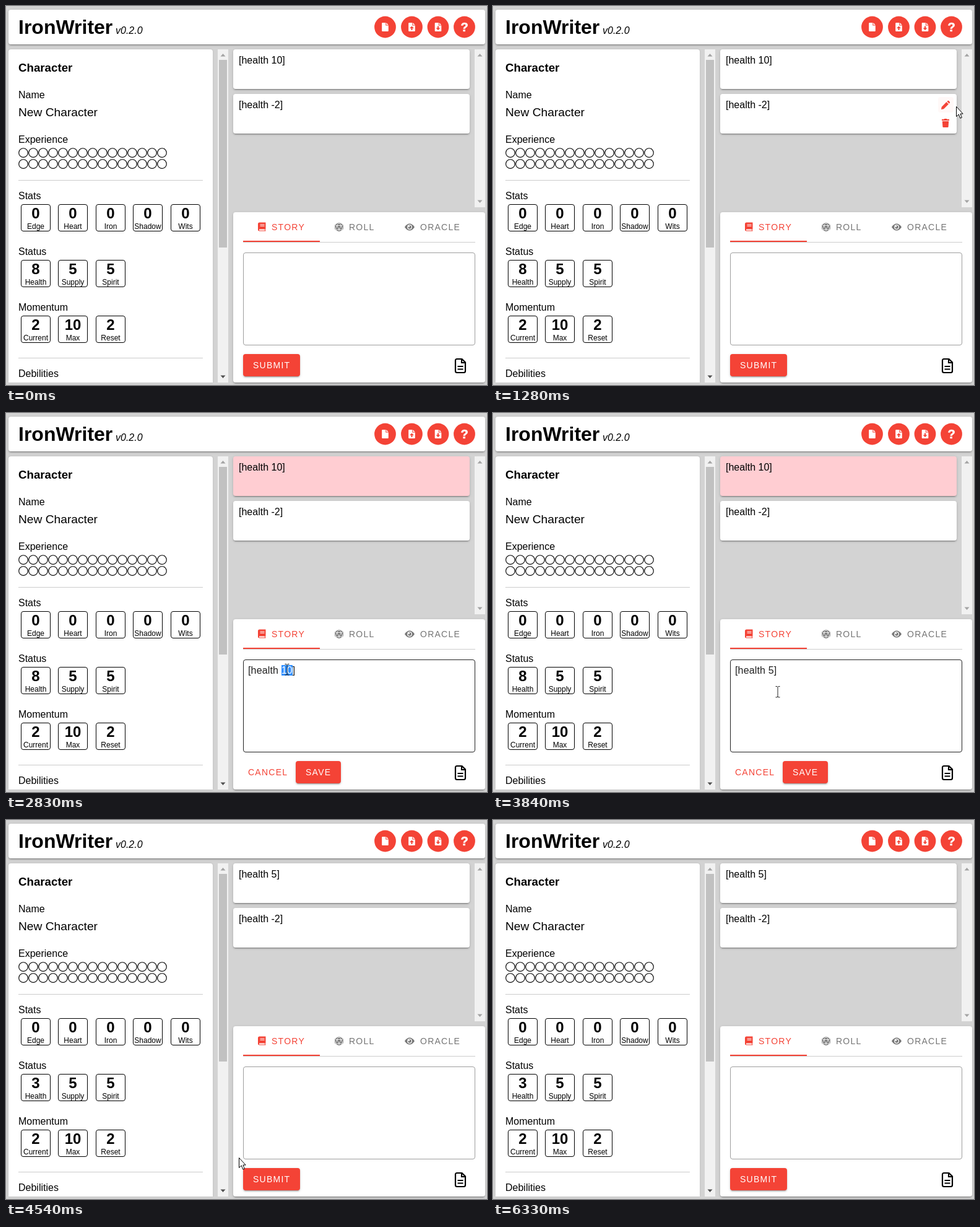
Animation of 777 by 612 pixels, one loop 6630 ms. Source, as an HTML page:

```html
<!DOCTYPE html>
<html lang="en">
<head>
<meta charset="utf-8">
<title>Character sheet</title>
<style>
  html, body { margin: 0; width: 100%; height: 100%; overflow: hidden; }
  body { position: relative; background: #d3d3d3; color: #000; font-family: "Liberation Sans", Arial, sans-serif; }
  body *, svg { position: absolute; }
  svg { left: 0; top: 0; }
  svg *, #area * { position: static; }
  .card, .button { border-radius: 4px; background: #fff;
    box-shadow: 0 3px 1px -2px #0003, 0 2px 2px #00000024, 0 1px 5px #0000001f; }
  .button, .button.raised { background: #f44336; }
  .button.hover { background: #f6554a; }
  .button.raised { background: #f6554a; box-shadow: 0 5px 5px -3px #0003, 0 8px 10px 1px #00000024, 0 3px 14px 2px #0000001f; }
  .pink { background: #ffcdd2; }
  .track { background: #f1f1f1; }
  .box { box-sizing: border-box; border: 1px solid #000; border-radius: 4px; }
  .text { white-space: pre; }
  .caps { letter-spacing: 1.25px; }
  .red { color: #f44336; }
  .gray { color: #757575; }
  .white { color: #fff; }
  #area { letter-spacing: .15px; color: #000000de; }
  .selected { background: #3390ff; color: #fff; }
</style>
</head>
<body>
<script>
const LOOP = 6630, STEP = 77.5;
const OPEN = 1890, SELECT = 2830, TYPE = 3670, PRESS = 4310, SAVE = 4370;
const RED = '#f44336', GRAY = '#757575';
let html = '', icons = '';

function rect(cls, x, y, w, h, id = '') {
  html += `<div class="${cls}" id="${id}" style="left:${x}px;top:${y}px;width:${w}px;height:${h}px"></div>`;
}

// Places text by its baseline; centred text is centred on x.
function text(x, baseline, str, { size = 16, weight = 400, cls = '', id = '', center = false, style = '' } = {}) {
  const ascent = Math.round(size * .905), height = ascent + Math.round(size * .212);
  const place = center ? `left:${x - 50}px;width:100px;text-align:center;` : `left:${x}px;`;
  html += `<div class="text ${cls}" id="${id}" style="${place}top:${baseline - ascent}px;` +
    `font-size:${size}px;font-weight:${weight};line-height:${height}px;${style}">${str}</div>`;
}

function icon(x, y, d, fill, extra = '') {
  icons += `<path transform="translate(${x} ${y})" d="${d}" fill="${fill}" ${extra}/>`;
}

function statRow(y, title, stats) {
  text(20, y, title);
  stats.forEach(([value, label], i) => {
    const x = Math.round(24 + i * 60.4);
    rect('box', x, y + 8, 48, 44);
    text(x + 24, y + 31, value, { size: 24, weight: 700, center: true, id: 'value' + label });
    text(x + 24, y + 48, label, { size: 12, center: true });
  });
}

function scrollbar(x, y, h, downColor) {
  rect('track', x, y, 17, h);
  icon(x + 8.5, y + 9, 'M-4 2.5L0-2L4 2.5Z', '#a3a3a3');
  icon(x + 8.5, y + h - 9, 'M-4-2.5L0 2L4-2.5Z', downColor);
}

// Header
rect('card', 4, 6, 770, 56);
text(20, 45, 'IronWriter', { size: 32, weight: 700 });
text(177, 45, 'v0.2.0', { style: 'font-style:italic' });
const FILE = 'M-5.3-6Q-5.3-7-4.3-7H.8V-2.5H5.3V6Q5.3 7 4.3 7H-4.3Q-5.3 7-5.3 6ZM1.8-7L5.3-3.5H1.8Z';
const ARROW_UP = 'M0-1.5L3.5 2H1V5H-1V2H-3.5Z', ARROW_DOWN = 'M0 5L3.5 1.5H1V-1.5H-1V1.5H-3.5Z';
[612.5, 655.5, 698, 740.5].forEach((x, i) => {
  icons += `<circle cx="${x}" cy="34" r="17.4" fill="${RED}"/>`;
  if (i < 3) icon(x, 34, FILE, '#fff');
  if (i == 1) icon(x, 34, ARROW_UP, RED);
  if (i == 2) icon(x, 34, ARROW_DOWN, RED);
});
icons += '<text x="740.5" y="41" text-anchor="middle" font-size="20" font-weight="700" fill="#fff" stroke="#fff" stroke-width=".6">?</text>';

// Character sheet
rect('card', 4, 70, 330, 538);
html = html.replace(/;height:538px/, ';height:538px;border-radius:4px 4px 0 0;box-shadow:0 0 3px #0002');
text(20, 106, 'Character', { size: 18.72, weight: 700 });
text(20, 149, 'Name');
text(20, 178, 'New Character', { size: 19.2 });
text(20, 221, 'Experience');
for (let i = 0; i < 30; i++)
  icons += `<circle cx="${28 + i % 15 * 16}" cy="${i < 15 ? 237 : 255}" r="7.3" fill="none" stroke="#000" stroke-width="1.15"/>`;
icon(20, 281, 'M0 0H298V1H0ZM0 287H298V288H0Z', '#ccc');
statRow(312, 'Stats', [[0, 'Edge'], [0, 'Heart'], [0, 'Iron'], [0, 'Shadow'], [0, 'Wits']]);
statRow(402, 'Status', [[8, 'Health'], [5, 'Supply'], [5, 'Spirit']]);
statRow(492, 'Momentum', [[2, 'Current'], [10, 'Max'], [2, 'Reset']]);
text(20, 599, 'Debilities');
scrollbar(342, 70, 538, '#505050');
icon(344, 87, 'M0 0H13V303H0Z', '#c1c1c1');

// Messages
const messageTops = [70, 142];
const PENCIL = 'M-7 7L-6.3 2.9L1.5-4.9L4.9-1.5L-2.9 6.3ZM2.4-5.8L3.8-7Q4.6-7.4 5.3-6.8L6.8-5.3Q7.4-4.6 7-3.8L5.8-2.4Z';
const TRASH = 'M-6-6H-2.5L-1.8-7H1.8L2.5-6H6V-4H-6ZM-5.2-3H5.2L4.6 6Q4.5 7 3.5 7H-3.5Q-4.5 7-4.6 6Z';
messageTops.forEach((y, i) => {
  rect('card', 367, y, 382, 64, 'message' + i);
  text(376, y + 23, '[health -2]', { id: 'messageText' + i });
  icons += `<g id="actions${i}"><rect id="glow${i}" x="719" y="${y + 5}" width="25" height="25" rx="4" fill="${RED}"/>`;
  icon(731, y + 18, PENCIL, RED);
  icon(731, y + 47, TRASH, RED);
  icons += '</g>';
});
scrollbar(757, 70, 255, '#a3a3a3');

// Editor
rect('card', 367, 333, 407, 275);
icon(383, 381, 'M0 0H375V1H0Z', '#ccc');
icon(383, 379, 'M0 0H124V2H0Z', RED);
text(429, 362, 'STORY', { size: 14, cls: 'caps red' });
text(554, 362, 'ROLL', { size: 14, cls: 'caps gray' });
text(669, 362, 'ORACLE', { size: 14, cls: 'caps gray' });
icon(413.5, 356.5, 'M-4-7H6V3.5L5.5 4V6H6V7H-4Q-6.5 7-6.5 4.5V-4.5Q-6.5-7-4-7ZM-3-4V-3H4V-4ZM-3-1.7V-.7H4V-1.7ZM-4.5 4V6H4.5V4Z', RED, 'fill-rule="evenodd"');
icon(538, 357, 'M0-7.5L6.7-3.7V3.7L0 7.5L-6.7 3.7V-3.7Z', GRAY);
icon(538, 357, 'M0-7L-3.5-2.5H3.5ZM-3.5-2.5L0 4L3.5-2.5M-6.5-3.5L-3.5-2.5L-6 4L0 4L6 4L3.5-2.5L6.5-3.5M0 4V7', 'none', 'stroke="#fff" stroke-width=".9"');
icon(652, 357, 'M-8 0Q-4.5-5.5 0-5.5T8 0Q4.5 5.5 0 5.5T-8 0Z', GRAY);
icons += `<circle cx="652" cy="357" r="3.3" fill="${GRAY}" stroke="#fff" stroke-width="1.3"/><circle cx="651" cy="356" r="1.2" fill="#fff"/>`;
rect('box', 383, 398, 375, 150, 'field');
text(391, 421, '', { id: 'area' });
rect('button', 383, 562, 92, 36, 'submit');
text(399, 585, 'SUBMIT', { size: 14, cls: 'caps white', id: 'submitText' });
rect('button', 468, 562, 73, 36, 'save');
text(484, 585, 'SAVE', { size: 14, cls: 'caps white', id: 'saveText' });
text(391, 585, 'CANCEL', { size: 14, cls: 'caps red', id: 'cancelText' });
icon(734, 581, 'M-5.5-11H2.5L8-5.5V8.5Q8 11 5.5 11H-5.5Q-8 11-8 8.5V-8.5Q-8-11-5.5-11ZM2-11V-5H8M-4.5 1H4.5M-4.5 5.5H4.5', 'none', 'stroke="#000" stroke-width="2.2"');

const pointers = {
  arrow: '<path d="M.5.5V16.5L4.3 13L6.8 19.2L9.4 18.1L6.9 12.1H11.2Z" fill="#fff" stroke="#000"/>',
  hand: '<path d="M-1.8 1.8Q0-1 1.8 1.8V7.5Q3.5 6 5 8Q6.7 7 7.8 9Q9.8 8.5 9.8 11V16Q9.5 18.5 8 20V22.5H-1.5V20.5L-6.3 14Q-7.3 11.5-5.3 11.3Q-3.7 11.3-1.8 14Z" fill="#fff" stroke="#000" stroke-width="1.2"/>' +
    '<path d="M1.8 7.5V11.5M5 8V12M7.8 9V12.5M1 16V19.5M3.5 16V19.5M6 16V19.5" fill="none" stroke="#000"/>',
  beam: '<path d="M-3.5-8.5H-1L0-7.5L1-8.5H3.5M0-7.5V8M-3.5 9H-1L0 8L1 9H3.5" fill="none" stroke="#222"/>'
};
for (const name in pointers) icons += `<g id="${name}">${pointers[name]}</g>`;
document.body.innerHTML = html + `<svg width="777" height="612">${icons}</svg>`;
const $ = id => document.getElementById(id);

// Pointer moves: start time, number of steps, points passed.
const AWAY = [900, 900];
const moves = [
  [0, 1, [AWAY]],
  [50, 9, [[620, 600], [300, 556], [60, 480], [3, 425], [34, 430]]],
  [740, 8, [[60, 424], [200, 390], [480, 280], [690, 185], [748, 162]]],
  [1360, 1, [AWAY]],
  [1430, 5, [[766, 104], [750, 95], [732, 83]]],
  [2050, 7, [[725, 104], [640, 210], [520, 350], [464, 408], [454, 414]]],
  [2580, 2, [[455, 415], [454, 414]]],
  [3670, 9, [[454, 418], [460, 450], [490, 530], [520, 575], [523, 586]]],
  [4370, 7, [[515, 582], [430, 560], [250, 510], [110, 460], [54, 438]]],
  [5000, 4, [[50, 440], [52, 457], [66, 442]]],
  [5310, 5, [[84, 438], [76, 420], [50, 436]]],
  [5710, 9, [[70, 448], [200, 470], [390, 500], [530, 540], [600, 640]]]
];

function spline(points, u) {
  const last = points.length - 1, i = Math.min(Math.floor(u * last), Math.max(last - 1, 0)), f = u * last - i;
  const at = k => points[Math.max(0, Math.min(last, k))];
  return [0, 1].map(axis => {
    const [a, b, c, d] = [-1, 0, 1, 2].map(k => at(i + k)[axis]);
    return b + f / 2 * (c - a + f * (2 * a - 5 * b + 4 * c - d + f * (3 * (b - c) + d - a)));
  });
}

function pointerAt(t) {
  const [start, steps, points] = moves.findLast(m => m[0] <= t);
  const step = Math.min(steps - 1, Math.floor((t - start) / STEP + .1));
  return spline(points, step / (steps - 1 || 1)).map(Math.round);
}

const show = (id, on) => $(id).style.display = on ? '' : 'none';

function render(t) {
  const [x, y] = pointerAt(t);
  const over = (left, top, w, h) => x >= left && x < left + w && y >= top && y < top + h;
  const editing = t >= OPEN && t < SAVE, saved = t >= SAVE;
  let hand = false;

  messageTops.forEach((top, i) => {
    const onPencil = over(719, top + 5, 25, 25);
    show('actions' + i, over(367, top, 382, 64));
    $('glow' + i).setAttribute('opacity', onPencil ? .14 : i && x > 740 ? .04 : 0);
    hand ||= onPencil || over(719, top + 34, 25, 25);
  });
  $('message0').classList.toggle('pink', editing);
  $('messageText0').textContent = saved ? '[health 5]' : '[health 10]';
  $('valueHealth').textContent = saved ? 3 : 8;

  const selected = t >= SELECT && t < TYPE;
  $('area').innerHTML = !editing ? '' : t >= TYPE ? '[health 5]'
    : selected ? '[health <span class="selected">10</span>]' : '[health 10]';
  const inField = over(383, 398, 375, 150);
  $('field').style.borderColor = inField || t >= SELECT && t < PRESS - 5 ? '#222' : '#9e9e9e';

  for (const id of ['save', 'saveText', 'cancelText']) show(id, editing);
  for (const id of ['submit', 'submitText']) show(id, !editing);
  const onSave = editing && over(468, 562, 73, 36), onSubmit = !editing && over(383, 562, 92, 36);
  $('save').classList.toggle('hover', onSave);
  $('save').classList.toggle('raised', onSave && t >= PRESS - 5);
  $('submit').classList.toggle('hover', onSubmit);
  hand ||= onSave || onSubmit || editing && over(383, 562, 80, 36) || over(383, 333, 375, 48);

  const shape = hand ? 'hand' : inField ? 'beam' : 'arrow';
  for (const name in pointers) show(name, name == shape);
  $(shape).setAttribute('transform', `translate(${x} ${y})`);
}

function frame() {
  render(performance.now() % LOOP);
  requestAnimationFrame(frame);
}
frame();
</script>
</body>
</html>
```
